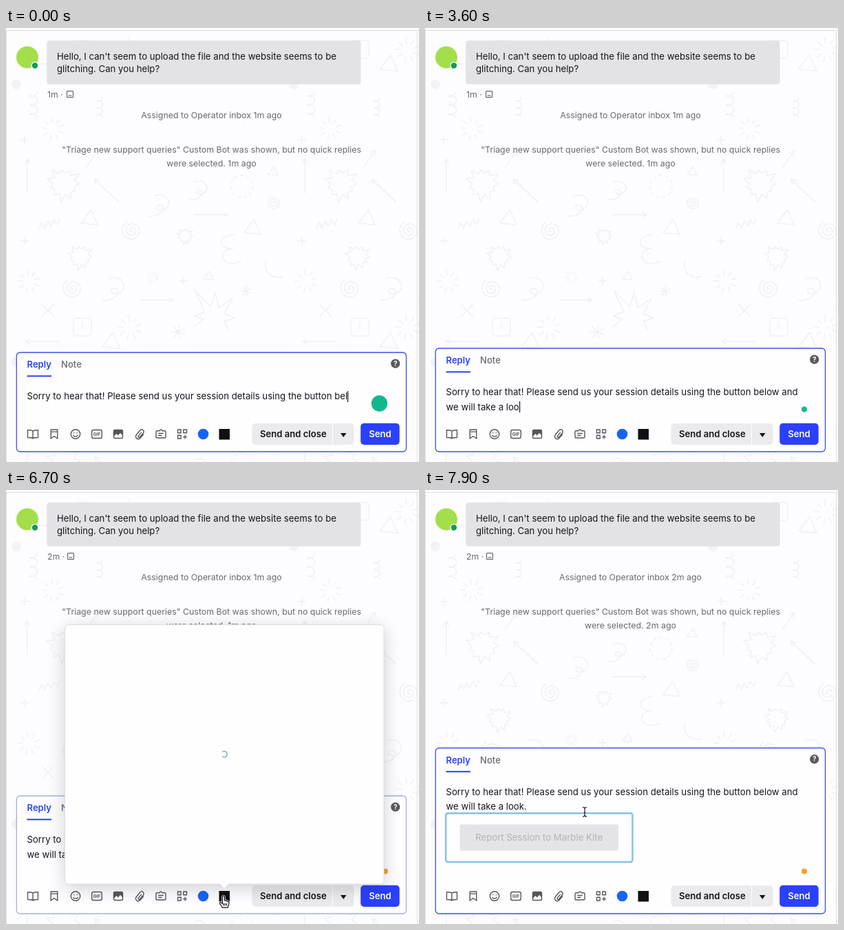
Animation, 600 px wide and 630 px high, one loop 8 s. Source, as an HTML page with a canvas:

```html
<!DOCTYPE html>
<html lang="en">
<head>
<meta charset="utf-8">
<title>Support reply</title>
<style>
  html, body { margin: 0; width: 100%; height: 100%; overflow: hidden; background: #fdfcfe; }
  canvas { display: block; width: 600px; height: 630px; }
</style>
</head>
<body>
<canvas id="stage"></canvas>
<script>
const W = 600, H = 630, LOOP = 8000, STEP = 100, TAU = Math.PI * 2;
const canvas = document.getElementById('stage');
const ctx = canvas.getContext('2d');
const dpr = window.devicePixelRatio || 1;
canvas.width = W * dpr;
canvas.height = H * dpr;

const BLUE = '#2b43ee', GREY = '#69696d', INK = '#151518', PAPER = '#fdfcfe', ICON = '#56565a';
const BODY = 13.2, LABEL = 13.1, SMALL = 12.38;
const LINE_1 = 'Sorry to hear that! Please send us your session details using the button below and ';
const LINE_2 = 'we will take a look.';
const MESSAGE = LINE_1 + LINE_2;

// [time, characters still to type]
const TYPING = [[0, 27], [900, 19], [2300, 8], [2700, 7], [3600, 2], [3700, 1], [4600, 1], [4700, 0]];
// [time, x, y, cursor]
const MOUSE = [[5700, 372, 528, 'beam'], [5900, 318, 573, 'arrow'], [6000, 307, 581, 'arrow'],
  [6200, 316, 588, 'hand'], [7100, 316, 590, 'hand'], [7500, 316, 590, 'arrow'],
  [7700, 258, 505, 'beam'], [7900, 232, 467, 'beam']];
const CARET_OFF = [[4000, 4400], [5000, 5500], [6300, 6600], [6700, LOOP]];

const at = (x, y, draw) => { ctx.save(); ctx.translate(x, y); draw(); ctx.restore(); };
const within = (t, [from, to]) => t >= from && t < to;

function rect(x, y, w, h, r, fill, stroke, width = 1) {
  ctx.beginPath();
  ctx.roundRect(x, y, w, h, r);
  if (fill) { ctx.fillStyle = fill; ctx.fill(); }
  if (stroke) { ctx.strokeStyle = stroke; ctx.lineWidth = width; ctx.stroke(); }
}

function disc(x, y, r, fill) {
  ctx.beginPath();
  ctx.arc(x, y, r, 0, TAU);
  ctx.fillStyle = fill;
  ctx.fill();
}

function text(str, x, y, { size = BODY, weight = 400, color = INK, align = 'left' } = {}) {
  ctx.font = `${weight} ${size}px Inter, sans-serif`;
  ctx.fillStyle = color;
  ctx.textAlign = align;
  ctx.fillText(str, x, y);
}

function track(keys, t, field) {
  const i = keys.findIndex(k => k[0] > t);
  if (i < 0) return keys[keys.length - 1][field];
  if (i === 0) return keys[0][field];
  const a = keys[i - 1], b = keys[i];
  return a[field] + (b[field] - a[field]) * (t - a[0]) / (b[0] - a[0]);
}

// Wallpaper doodles, each drawn around its own centre
const line = (...pts) => pts.forEach(([x, y], i) => i ? ctx.lineTo(x, y) : ctx.moveTo(x, y));
const polar = (r, a) => [r * Math.cos(a), r * Math.sin(a)];
function spokes(n, inner, outer) {
  for (let i = 0; i < n; i++) line(polar(inner, i / n * TAU + .4), polar(outer, i / n * TAU + .4));
}
const DRAW = {
  star(r) {
    for (let i = 0; i < 22; i++) {
      const reach = i % 2 ? .58 : .86 + .14 * Math.sin(i * 2.3);
      const p = polar(r * reach, i / 22 * TAU);
      i ? ctx.lineTo(...p) : ctx.moveTo(...p);
    }
    ctx.closePath();
  },
  burst(r) {
    line([-r, r * .75], [-r * .5, r * .35], [-r * .95, r * .2], [-r * .45, 0], [-r * .9, -r], [-r * .15, -r * .25],
      [r * .05, -r * .95], [r * .25, -r * .2], [r * .9, -r * .65], [r * .5, r * .1], [r, r * .3], [r * .5, r * .45], [r * .7, r * .9]);
  },
  spiral(r) {
    for (let a = 0; a < TAU * 2.7; a += .25) ctx.lineTo(...polar(r * a / (TAU * 2.7), a));
  },
  triangle(r) { line([-r, r * .6], [r * .2, -r], [r, r * .8]); ctx.closePath(); },
  arrow(len, turn = 0) {
    ctx.rotate(turn * Math.PI / 180);
    line([-len, 0], [len, 0]);
    line([len - 7, -4], [len, 0], [len - 7, 4]);
  },
  plus(r) { line([-r, 0], [r, 0]); line([0, -r], [0, r]); },
  cross(r) { line([-r, -r], [r, r]); line([r, -r], [-r, r]); },
  asterisk(r) { spokes(7, 0, r); },
  rays(r) { spokes(9, r * .5, r); },
  curl(r) {
    ctx.moveTo(-r * .5, -r * .8);
    ctx.bezierCurveTo(r * .6, -r * 1.3, r * 1.4, -r * .1, r * .4, r * .4);
    ctx.bezierCurveTo(-r * .3, r * .7, -r * .5, -r * .1, r * .1, 0);
    ctx.bezierCurveTo(r * .8, r * .3, 0, r * 1.1, -r, r);
  },
  script(r) {
    ctx.moveTo(r * .4, -r * 1.2);
    ctx.bezierCurveTo(-r * 1.3, -r, -r * .9, r * .1, r * .3, 0);
    ctx.bezierCurveTo(-r * 1.2, r * .1, -r * .7, r * 1.8, r, r * 1.1);
  },
  hook(r) {
    ctx.moveTo(-r * .8, -r * .6);
    ctx.bezierCurveTo(-r * 1.2, r * .4, -r * .1, r * 1.3, r * .8, r * .9);
  },
  spring(r) {
    for (let a = 0; a < TAU * 3; a += .3) ctx.lineTo(r * .28 * Math.cos(a), -r + a * r / 9.5 + r * .16 * Math.sin(a));
  },
  wave(r) {
    for (let x = -r; x <= r; x++) ctx.lineTo(x, 4 * Math.sin(x * .7) - x * .25);
  },
  box(r) {
    ctx.roundRect(-r, -r, 2 * r, 2 * r, 4);
    line([0, -7], [0, 3]);
    line([0, 6], [0, 7]);
  },
  dashed(r) { ctx.setLineDash([5, 4]); ctx.arc(0, 0, r, 0, TAU); },
};
const DOODLES = {
  star: [[84, 226, 27], [108, 332, 20], [260, 302, 13]],
  burst: [[302, 412, 30]],
  spiral: [[97, 378, 15], [183, 294, 15], [390, 254, 10]],
  triangle: [[153, 52, 13], [121, 276, 12], [358, 290, 12], [294, 360, 7], [388, 208, 7]],
  arrow: [[53, 52, 25, 180], [219, 395, 24], [297, 271, 25], [146, 236, 24, 223], [31, 215, 25, -90], [125, 190, 15, -55]],
  plus: [[27, 162, 6], [27, 309, 6], [258, 367, 6]],
  cross: [[61, 410, 9], [353, 128, 7]],
  asterisk: [[250, 38, 11], [349, 382, 8]],
  rays: [[33, 368, 17], [180, 32, 18], [68, 146, 17], [213, 362, 9]],
  curl: [[157, 378, 17], [223, 257, 16], [280, 235, 14]],
  script: [[325, 320, 17]],
  hook: [[390, 347, 15]],
  spring: [[40, 112, 20], [136, 116, 15]],
  wave: [[63, 284, 15]],
  box: [[111, 31, 13]],
  dashed: [[343, 230, 16]],
};

function wallpaper() {
  const TILE = 403;
  ctx.strokeStyle = '#f0eff2';
  ctx.lineWidth = 1.4;
  for (const ox of [-TILE, 0, TILE]) for (const oy of [0, TILE]) {
    for (const [kind, places] of Object.entries(DOODLES)) {
      for (const [x, y, ...args] of places) {
        at(x + ox, y + oy, () => { ctx.beginPath(); DRAW[kind](...args); ctx.stroke(); });
      }
    }
    disc(15 + ox, 82 + oy, 7, '#f3f2f5');
  }
  ctx.fillStyle = '#dedde1';
  ctx.fillRect(0, 3, W, 1);
  ctx.fillRect(0, 3, 1, H);
  ctx.fillRect(597, 3, 1, H);
}

function conversation(t) {
  disc(31, 42.5, 16, '#a3df4b');
  disc(42, 54.5, 5.5, PAPER);
  disc(42, 54.5, 4.2, '#129b5b');
  rect(59.3, 18.3, 456.2, 63.5, 4, '#e3e2e5');
  text("Hello, I can't seem to upload the file and the website seems to be", 74, 46);
  text('glitching. Can you help?', 74, 63.5);

  const late = t >= 5200, shift = late ? 1 : 0;
  text(late ? '2m ·' : '1m ·', 60, 100.7, { size: SMALL, color: GREY });
  rect(88.5 + shift, 91.7, 9, 9, 1, null, GREY, 1.2);
  ctx.beginPath();
  line([90.5 + shift, 98], [95.5 + shift, 98]);
  ctx.stroke();

  const age = t >= 7600 ? '2m' : '1m';
  const note = { size: SMALL, color: GREY, align: 'center' };
  text(`Assigned to Operator inbox ${age} ago`, 298.5, 131.3, note);
  text('"Triage new support queries" Custom Bot was shown, but no quick replies', 298.7, 181.3, note);
  text(`were selected. ${age} ago`, 298.5, 200.8, note);
}

const ICONS = [
  [39, 'M0 -4.5C-2 -6 -5 -5.8 -7.5 -5.8V5C-5 5 -2 5 0 6.3C2 5 5 5 7.5 5V-5.8C5 -5.8 2 -6 0 -4.5V6'],
  [70, 'M-4.8 -6.5H4.8V6.5L0 3L-4.8 6.5ZM-4.8 -3.4H4.8'],
  [101, 'M6.7 0A6.7 6.7 0 1 1 -6.7 0A6.7 6.7 0 1 1 6.7 0M-3.4 1.6C-2 4.3 2 4.3 3.4 1.6M-2.3 -2.4V-1.2M2.3 -2.4V-1.2'],
  [132, 'M-5 -6H5Q7.3 -6 7.3 -3.5V3.5Q7.3 6 5 6H-5Q-7.3 6 -7.3 3.5V-3.5Q-7.3 -6 -5 -6Z'],
  [163, 'M-5 -6H5Q6.5 -6 6.5 -4.5V4.5Q6.5 6 5 6H-5Q-6.5 6 -6.5 4.5V-4.5Q-6.5 -6 -5 -6Z'],
  [194, 'M2.8 -2.6L-1.6 2.6C-2.8 4.2 -.6 5.8 .7 4.2L5.2 -1.2C8 -4.8 3.6 -8.6 .6 -5.2L-4.4 .8C-8 5.4 -2.2 9.4 1.2 5.6L5.8 .2'],
  [225, 'M-5.5 -4.8H-2L-1 -6.2H1L2 -4.8H5.5Q7 -4.8 7 -3.3V4Q7 5.5 5.5 5.5H-5.5Q-7 5.5 -7 4V-3.3Q-7 -4.8 -5.5 -4.8ZM-3.8 -1H3.8M-3.8 2H1.5'],
  [256, 'M-6.5 -6.5H-1.8V-1.8H-6.5ZM1.8 -6.5H6.5V-1.8H1.8ZM-6.5 1.8H-1.8V6.5H-6.5ZM4.1 1.2V7M1.2 4.1H7'],
].map(([x, d]) => [x, new Path2D(d)]);
const PICTURE_SKY = new Path2D('M-6 -5.5H6V1.5L3 -1.8L-.2 2L-2.6 -.4L-6 3Z');

function toolbar() {
  ctx.strokeStyle = ICON;
  ctx.lineWidth = 1.4;
  ctx.lineJoin = 'round';
  for (const [x, path] of ICONS) at(x, 589.5, () => ctx.stroke(path));
  text('GIF', 132, 592, { size: 6.5, weight: 700, color: ICON, align: 'center' });
  at(163, 589.5, () => ctx.fill(PICTURE_SKY));
  disc(286.5, 589.5, 7.8, '#1764f4');
  rect(309.5, 582, 15.5, 15.5, 0, '#111113');

  rect(357.5, 574, 148, 31, 5, '#ebeaed');
  ctx.fillStyle = PAPER;
  ctx.fillRect(474, 574, 1, 31);
  text('Send and close', 369, 594, { size: LABEL, weight: 600 });
  ctx.beginPath();
  line([486, 588], [494.5, 588], [490.2, 594]);
  ctx.fill();
  rect(515.2, 573.8, 56.5, 31.2, 5, '#2b40fb');
  text('Send', 543.5, 594, { size: LABEL, weight: 600, color: '#fff', align: 'center' });
}

function draft(t, top) {
  const typed = MESSAGE.slice(0, MESSAGE.length - Math.round(track(TYPING, t, 1)));
  const lines = t < 1000 ? [typed] : [LINE_1, typed.slice(LINE_1.length)];
  if (t >= 5700) lines.push('');
  const base = top + 68.3;
  lines.forEach((str, i) => text(str, 30.5, base + i * 21.2));
  if (!CARET_OFF.some(span => within(t, span))) {
    const last = lines.length - 1;
    const x = 30.5 + ctx.measureText(lines[last]).width;
    ctx.fillStyle = INK;
    ctx.fillRect(Math.round(x), Math.round(base + last * 21.2 - 12.5), 1.2, 16);
  }
}

function composer(t, popupOpen) {
  const top = t < 1000 ? 471 : t < 5700 ? 465 : t < 7500 ? 444 : 374.5;
  rect(15.3, top, 566.2, 615 - top, 5, '#fefdff', popupOpen ? '#a7b0df' : '#3c50ea', 1.3);
  text('Reply', 30.5, top + 22.4, { size: LABEL, weight: 600, color: BLUE });
  text('Note', 80, top + 22.4, { size: LABEL, weight: 500, color: GREY });
  ctx.fillStyle = BLUE;
  ctx.fillRect(30.5, top + 33.3, 35.5, 2);
  disc(565.7, top + 16.1, 6.6, '#59595d');
  text('?', 565.7, top + 19.8, { size: 10, weight: 700, color: '#fff', align: 'center' });
  draft(t, top);

  if (t >= 7500) {
    rect(30.2, 469.2, 271.3, 70.8, 3, '#fefdff', '#85c0e8', 2.4);
    rect(50.5, 485.5, 230.5, 38, 3, '#e4e3e6');
    text('Report Session to Marble Kite', 165.7, 508.5, { color: '#b3b2b7', align: 'center' });
  }
  if (t < 500) disc(542.5, 545, 11.7, '#12b88b');
  else disc(551, 553.5, 4, t < 5100 ? '#14b892' : '#f6a41c');
  toolbar();
}

function popup(t) {
  ctx.save();
  ctx.shadowColor = 'rgba(20, 20, 40, .2)';
  ctx.shadowBlur = 26 * dpr;
  ctx.shadowOffsetY = 6 * dpr;
  rect(85.5, 195.5, 463.5, 376.5, 5, '#fefdff');
  ctx.restore();
  rect(85.5, 195.5, 463.5, 376.5, 5, '#fefdff', '#d9d8dd', .8);
  ctx.fillStyle = '#fefdff';
  ctx.beginPath();
  line([310, 571], [324, 571], [317, 578]);
  ctx.fill();
  const turn = (t - 7100) / 800 * TAU;
  ctx.strokeStyle = '#8e9be0';
  ctx.lineWidth = 1.5;
  ctx.beginPath();
  ctx.arc(317, 383.5, 4.2, turn + .9, turn + 5.4);
  ctx.stroke();
}

const CURSORS = {
  arrow: new Path2D('M0 0V14L3.2 11L5.3 16L7.6 15L5.5 10.2H10Z'),
  hand: new Path2D('M-1.5 1Q0 -1.5 1.4 1V7Q3 5.5 4 7.5Q5.8 6.5 6.3 8.5Q8 8 8 10.5Q8 14 6 17H-2Q-3 14 -5.5 11.5Q-6 8.5 -3 10L-1.5 11.5Z'),
  beam: new Path2D('M-3 -6.5Q0 -6.5 0 -4.5Q0 -6.5 3 -6.5M0 -4.5V5M-3 7Q0 7 0 5Q0 7 3 7M-1.5 1.5H1.5'),
};

function pointer(t) {
  if (t < MOUSE[0][0]) return;
  const kind = MOUSE.filter(k => k[0] <= t).pop()[3];
  const shape = CURSORS[kind];
  at(track(MOUSE, t, 1), track(MOUSE, t, 2), () => {
    ctx.strokeStyle = '#fff';
    ctx.lineWidth = 2.4;
    ctx.stroke(shape);
    ctx.fillStyle = kind === 'hand' ? '#fff' : '#000';
    if (kind !== 'beam') ctx.fill(shape);
    if (kind === 'arrow') return;
    ctx.strokeStyle = '#111';
    ctx.lineWidth = 1.2;
    ctx.stroke(shape);
    if (kind === 'hand') {
      ctx.beginPath();
      for (const x of [0, 2.3, 4.6]) line([x, 11], [x, 14.5]);
      ctx.stroke();
    }
  });
}

function render(t) {
  ctx.setTransform(dpr, 0, 0, dpr, 0, 0);
  ctx.fillStyle = PAPER;
  ctx.fillRect(0, 0, W, H);
  const popupOpen = within(t, [6700, 7500]);
  wallpaper();
  conversation(t);
  composer(t, popupOpen);
  if (popupOpen) popup(t);
  pointer(t);
}

let start, shown = -1;
function frame(now) {
  start ??= now;
  const t = Math.floor((now - start) % LOOP / STEP) * STEP;
  if (t !== shown) render(shown = t);
  requestAnimationFrame(frame);
}
requestAnimationFrame(frame);
</script>
</body>
</html>
```
